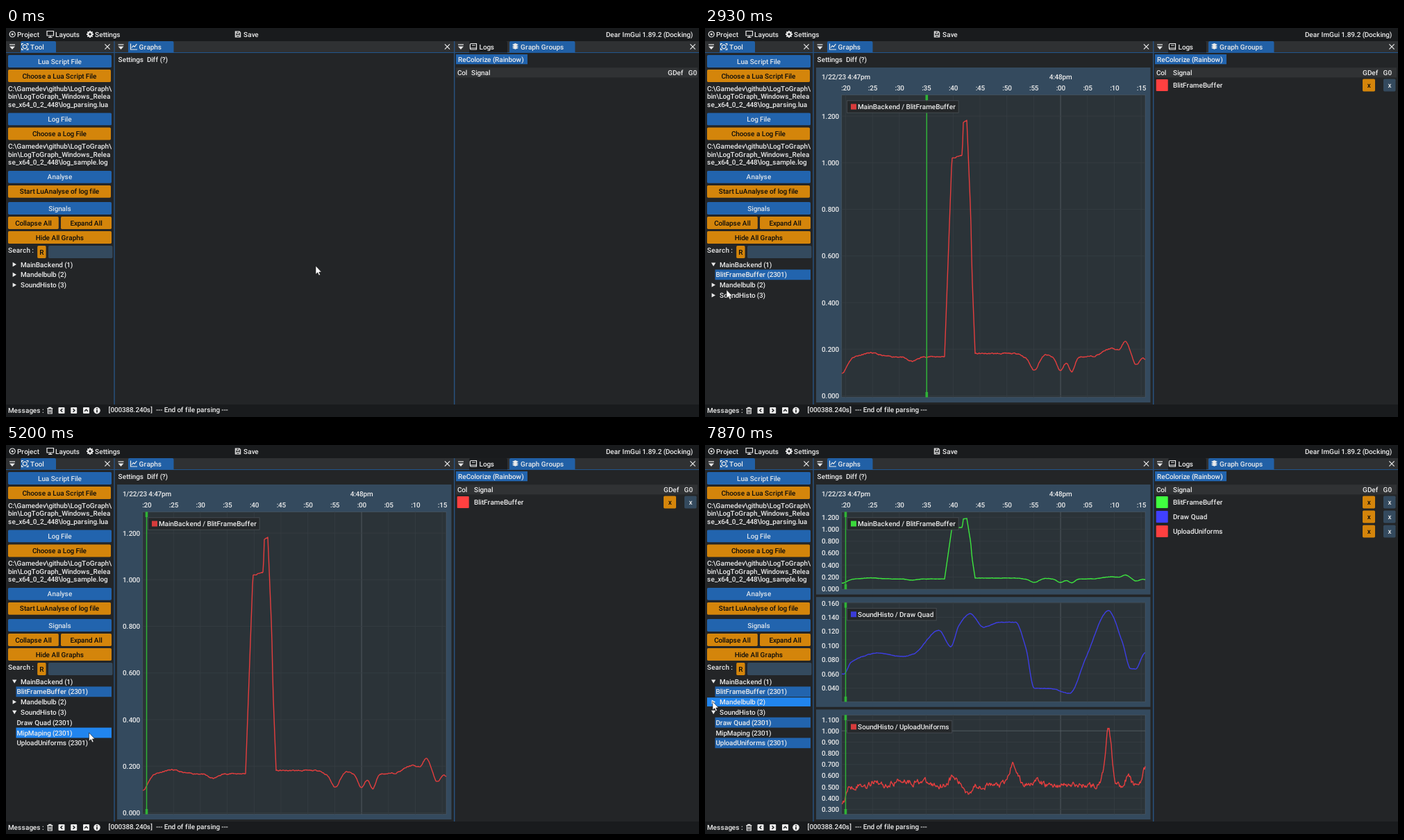
Write an HTML page that moves like this. It is 998 by 561 pixels and loops after 8 s.

```html
<!DOCTYPE html>
<html lang="en">
<head>
<meta charset="utf-8">
<title>Log graphs</title>
<style>
html, body { margin: 0; width: 100%; height: 100%; overflow: hidden; background: #232527; }
svg { display: block; width: 998px; height: 561px; }
text {
  font: 500 9.98px Roboto, "Open Sans", sans-serif;
  font-kerning: none; font-variant-ligatures: none;
  text-rendering: geometricPrecision;
}
.ico { fill: none; stroke: #ebebeb; stroke-width: 1.2; }
.solid { fill: #ebebeb; }
</style>
</head>
<body>
<svg id="stage" viewBox="0 0 998 561" xmlns="http://www.w3.org/2000/svg">
  <g id="chrome"></g>
  <g id="live"></g>
  <path id="cursor" d="M0 0V12.2L2.8 9.7L4.7 13.8L6.6 13L4.8 9H8.4Z" fill="#fff" stroke="#111" stroke-width=".6"/>
</svg>
<script>
const LOOP = 8000, STEP = 0.015, ZOOM = 998 / 1280;
const BLUE = '#2264ae', BRIGHT = '#2185ee', ORANGE = '#d4850b', SLATE = '#344a5e';
const INK = '#ebebeb', DARK = '#191b1d', STRIP = '#2f3133';
const $ = id => document.getElementById(id);

// ---- drawing helpers
// Glyph advances are whole pixels at the unscaled interface size of 12.8 px.
const pen = document.createElement('canvas').getContext('2d');
pen.font = '500 128px Roboto, "Open Sans", sans-serif';
const widths = {};
const advance = c => widths[c] ??= Math.round(pen.measureText(c).width / 10) * ZOOM;
const widthOf = s => [...s].reduce((w, c) => w + advance(c), 0);

function text(x, mid, s, align = 0, fill = INK) {
  x -= widthOf(s) * align;
  const spots = [...s].map(c => { const at = x; x += advance(c); return at.toFixed(2); });
  return `<text x="${spots.join(' ')}" y="${mid + 3.5}" fill="${fill}">${s}</text>`;
}
const rect = (x, y, w, h, fill, r = 0, more = '') =>
  `<rect x="${x}" y="${y}" width="${w}" height="${h}" rx="${r}" fill="${fill}" ${more}/>`;
const line = (x1, y1, x2, y2, color, w = 0.8) =>
  `<path d="M${x1} ${y1}L${x2} ${y2}" stroke="${color}" stroke-width="${w}" fill="none"/>`;
const icon = (d, cls = 'ico') => `<path class="${cls}" d="${d}"/>`;
const button = (x, mid, w, label, fill, ink) =>
  rect(x, mid - 8.9, w, 17.8, fill, 1.6) + text(x + w / 2, mid, label, 0.5, ink);
const bar = (mid, label) => button(3, mid, 149, label, BLUE, '#dce3ea');
const act = (mid, label, x = 3, w = 148) => button(x, mid, w, label, ORANGE, '#0c0c0c');
const menuMark = x => icon(`M${x - 4} 24H${x + 4}`) + icon(`M${x - 4} 26.5H${x + 4}L${x} 31Z`, 'solid');
const cross = x => icon(`M${x - 3.6} 23.4l7.2 7.2m0 -7.2l-7.2 7.2`);
const tab = (x, w, fill = '#2160a6') => `<path d="M${x} 35.5V21q0 -2 2 -2h${w - 4}q2 0 2 2V35.5Z" fill="${fill}"/>`;

function chrome() {
  const file = (y, name) =>
    ['C:\\Gamedev\\github\\LogToGraph\\', 'bin\\LogToGraph_Windows_Relea', 'se_x64_0_2_448\\' + name]
      .map((s, i) => text(3, y + i * 11.7, s)).join('');
  const chevron = (x, turn) => rect(x - 4.5, 547, 9, 9, INK, 1) +
    `<path d="M-1.2 -2.3l2.4 2.3l-2.4 2.3" transform="translate(${x} 551.5) rotate(${turn})" fill="none" stroke="${DARK}" stroke-width="1.4"/>`;
  const gear = [0, 45, 90, 135].map(a =>
    `<path d="M121 4v2.6M121 11.4v2.6" stroke="${INK}" stroke-width="2" transform="rotate(${a} 121 9)"/>`).join('');
  return rect(0, 0, 998, 561, '#232527') + rect(0, 0, 998, 19, DARK) +
    rect(0, 19, 998, 16.5, STRIP) + rect(0, 543, 998, 18, DARK) +
    line(0, 35.5, 998, 35.5, '#2160a6') +
    [156, 645.7].map(x => line(x, 19, x, 543, '#28517d', 1.5)).join('') +
    // menu bar
    '<circle class="ico" cx="9.2" cy="9" r="4"/><circle class="solid" cx="9.2" cy="9" r="1.6"/>' +
    icon('M59 4.5h9.5v6.5h-9.5zM63.7 11v2.5M61 13.3h5.5') +
    gear + '<circle class="ico" cx="121" cy="9" r="2.7" style="stroke-width:2"/>' +
    icon('M330.4 5h5.6l1.6 1.6v6.4h-7.2zM332 5v2.6h3.4V5M332.2 13v-2.6h3.6V13') +
    text(16, 9, 'Project') + text(71, 9, 'Layouts') + text(128, 9, 'Settings') + text(342, 9, 'Save') +
    text(864, 9, 'Dear ImGui 1.89.2 (Docking)') +
    // tabs
    tab(21, 51) + tab(176, 65.5) + tab(667, 55, '#1b1d1f') + tab(725, 94.5) +
    [9, 165.5, 655].map(menuMark).join('') + [146, 635.5, 989].map(cross).join('') +
    icon('M22.6 25v-2.4h2.4M29.4 22.6h2.4V25M31.8 29v2.4h-2.4M25 31.4h-2.4V29M27.2 24l2.8 1.5v3l-2.8 1.5l-2.8 -1.5v-3z') +
    icon('M179.5 22.5v8.5h9.5M181 28.5l2.4 -3l1.8 1.6l3.2 -4') +
    icon('M670 22.5h7.5v8.5h-7.5q-1.6 0 -1.6 -1.6v-5.3q0 -1.6 1.6 -1.6zM669 29h8.5M671 25h4.5') +
    [22, 24.4, 26.8].map(y => icon(`M733.5 ${y}l4.6 2l-4.6 2l-4.6 -2z`, 'solid')).join('') +
    text(35, 27, 'Tool') + text(191.5, 27, 'Graphs') + text(681.5, 27, 'Logs') + text(741, 27, 'Graph Groups') +
    // tool panel
    bar(48, 'Lua Script File') + act(69, 'Choose a Lua Script File') + file(87, 'log_parsing.lua') +
    bar(131.4, 'Log File') + act(152.5, 'Choose a Log File') + file(170.4, 'log_sample.log') +
    bar(214.8, 'Analyse') + act(235.8, 'Start LuAnalyse of log file') +
    bar(260, 'Signals') + act(281, 'Collapse All', 3, 72.8) + act(281, 'Expand All', 79, 73) +
    act(302, 'Hide All Graphs', 3, 149) + text(3, 320, 'Search :') +
    act(323, 'R', 45.2, 12.4) + rect(61, 314.1, 92.5, 17.8, SLATE, 1.6) +
    // graph and group panels
    text(161.5, 45, 'Settings') + text(203, 45, 'Diff (?)') +
    rect(648, 38, 103, 14.2, BLUE) + text(651, 45, 'ReColorize (Rainbow)') +
    rect(648, 57.2, 348, 14.2, '#303234') +
    // message bar
    text(3, 551.8, 'Messages :') +
    icon('M59.3 548.7h8M61.8 548.6v-1.3h3v1.3M60.4 549v7h5.8v-7M62.3 550.5v4M64.3 550.5v4') +
    chevron(80, 180) + chevron(97.7, 0) + chevron(115.5, -90) +
    '<circle class="solid" cx="131" cy="551.6" r="4.8"/>' +
    `<path d="M131 548.3v1.4M131 550.8v3.8" stroke="${DARK}" stroke-width="1.6"/>` +
    text(147.5, 550.8, '[000388.240s]') + text(216, 550.8, '--- End of file parsing ---');
}

// ---- signals as functions of the plot x
const LEFT = 196.7, RIGHT = 634, X0 = 202.5, PER_SEC = 7.74;
const clamp = p => Math.min(1, Math.max(0, p));
const smooth = p => p * p * (3 - 2 * p);

// Gaussian bumps: centre, width, height
const bumps = (base, list) => x =>
  list.reduce((v, [c, w, h]) => v + h * Math.exp(-(((x - c) / w) ** 2)), base);

// Key points joined by straight lines, or by a monotone cubic when `soft`.
function through(keys, soft) {
  const slope = i => keys[i] && keys[i + 1]
    ? (keys[i + 1][1] - keys[i][1]) / (keys[i + 1][0] - keys[i][0]) : 0;
  const tangent = i => {
    const a = slope(i - 1), b = slope(i);
    return a * b > 0 ? 2 * a * b / (a + b) : 0;
  };
  return x => {
    let i = 0;
    while (i < keys.length - 2 && keys[i + 1][0] < x) i++;
    const [xa, va] = keys[i], [xb, vb] = keys[i + 1], w = xb - xa, p = clamp((x - xa) / w);
    if (!soft) return va + (vb - va) * p;
    const q = 1 - p;
    return va + (vb - va) * smooth(p) + w * p * q * (tangent(i) * q - tangent(i + 1) * p);
  };
}

const spike = through([[345, 0], [355.5, 0.85], [370.5, 0.865], [372, 1.005], [377, 1.014],
  [382.7, 0.61], [384.5, 0.355], [389, 0.013396], [451, 0.013396], [460, 0]]);
const ripple = bumps(0.168, [[197, 10, -0.07], [238, 16, 0.016], [298, 10, -0.02], [474, 8, -0.058],
  [491, 6, 0.008], [512, 7, -0.06], [528, 6, -0.065], [585, 16, 0.035], [606, 7, 0.06], [621, 6, -0.035], [640, 8, -0.02]]);
const blit = x => ripple(x) + spike(x);

const quad = through([[200, 0.06], [211, 0.077], [250, 0.0895], [284, 0.0845], [300, 0.088], [337, 0.1215],
  [354, 0.0985], [366, 0.129], [382, 0.145], [401, 0.126], [424, 0.133], [447, 0.133], [462, 0.097], [474, 0.04],
  [500, 0.039], [525, 0.0325], [549, 0.084], [581, 0.149], [601, 0.105], [613, 0.067], [620, 0.067], [634, 0.09]], true);

const load = bumps(0.515, [[195, 9, -0.19], [246, 6, 0.05], [285, 14, 0.05], [312, 10, 0.04], [357, 8, 0.07],
  [379, 7, -0.06], [444, 8, 0.19], [475, 10, 0.04], [581, 6.5, 0.5], [609, 5, 0.08], [636, 8, 0.16]]);

let seed = 11;
const rnd = () => (seed = seed * 16807 % 2147483647) / 2147483647 - 0.5;
function sample(fn, noise) {
  const pts = [];
  for (let x = 197, drift = 0; x <= RIGHT; x++) {
    drift = drift * 0.6 + rnd() * noise;
    pts.push([x, fn(x) + drift]);
  }
  return pts;
}

const SIGNALS = [
  { group: 'MainBackend', name: 'BlitFrameBuffer', pts: sample(blit, 0.004), lo: -0.006, hi: 1.291, step: 0.2 },
  { group: 'SoundHisto', name: 'Draw Quad', pts: sample(quad, 0.0006), lo: 0.0206, hi: 0.1608, step: 0.02 },
  { group: 'SoundHisto', name: 'UploadUniforms', pts: sample(load, 0.045), lo: 0.257, hi: 1.141, step: 0.1 }
];

// Cosine rainbow spread over the visible signals
function color(i, count) {
  const part = c => Math.round(127.5 + 127.5 * Math.cos(2 * Math.PI * ((i + 1) / count - c / 3)));
  return `rgb(${part(0)},${part(1)},${part(2)})`;
}

function plot(i, count, mark) {
  const { group, name, pts, lo, hi, step } = SIGNALS[i];
  const gap = 3.6, h = (483 - gap * (count - 1)) / count, top = 57 + i * (h + gap);
  const y0 = top + (i ? 8 : 39.5), y1 = top + h - 7.5, tint = color(i, count);
  const toY = v => y1 - (v - lo) / (hi - lo) * (y1 - y0);
  let s = rect(160, top, 481.5, h, SLATE) +
    rect(LEFT, y0, RIGHT - LEFT, y1 - y0, '#2b3338', 0, 'stroke="#6e7882" stroke-opacity=".35" stroke-width=".8"');
  for (let k = 0; k < 12; k++) {
    const x = X0 + k * 5 * PER_SEC;
    s += line(x, y0, x, y1, k === 8 ? '#5c646a' : '#363e43');
    if (!i) s += text(x + 0.3, 86.5, ':' + String((20 + k * 5) % 60).padStart(2, '0'), 0.5);
  }
  if (!i) s += text(203, 70.8, '1/22/23 4:47pm', 0.5) + text(512.2, 70.8, '4:48pm', 0.5);
  for (let k = Math.ceil(lo / step); k <= hi / step; k++) {
    const y = toY(k * step);
    s += line(LEFT, y, RIGHT, y, i === 2 && k === 10 ? '#5c646a' : '#363e43') +
      text(193, y, (k * step).toFixed(3), 1);
  }
  const d = pts.map(([x, v]) => x + ' ' + toY(v).toFixed(2)).join('L');
  s += `<path d="M${d}" fill="none" stroke="${tint}" stroke-opacity=".87" stroke-width="1.4" stroke-linejoin="round"/>` +
    line(mark, y0, mark, y1, '#2fb237', 1.5) + line(mark, y0, mark, y0 + 7.5, '#2fb237', 3.6) +
    line(mark, y1 - 7.5, mark, y1, '#2fb237', 3.6);
  const label = `${group} / ${name}`, mid = y0 + 17;
  return s + rect(204.5, mid - 8.7, widthOf(label) + 19.5, 17.4, '#242629', 0, 'fill-opacity=".92" stroke="#4a5056" stroke-width=".8"') +
    rect(210, mid - 4, 8, 8, tint, 0, 'opacity=".82"') + text(220, mid, label);
}

function groups(count) {
  const shift = count ? 6 : 0;
  let s = text(650, 64.3, 'Col') + text(count ? 674 : 670, 64.3, 'Signal') +
    text(953 - shift, 64.3, 'GDef') + text(982.5 - shift, 64.3, 'G0');
  for (let i = 0; i < count; i++) {
    const y = 82.5 + i * 21;
    s += rect(649.7, y - 8.5, 17, 17, color(i, count), 1) + text(674, y, SIGNALS[i].name) +
      act(y, 'x', 947, 18) + button(977, y, 17.5, 'x', SLATE);
  }
  return s;
}

// ---- clicks, in steps: press on a tree row, then its effect
const OPEN_MAIN = 19, PICK_BLIT = 32, OPEN_SOUND = 60, PICK_QUAD = 97, PICK_UPLOAD = 107;
const PICKS = [PICK_BLIT, PICK_QUAD, PICK_UPLOAD];
const held = n => PICKS.includes(n) || n >= OPEN_MAIN && n < OPEN_MAIN + 2 || n >= OPEN_SOUND && n < OPEN_SOUND + 3;

function tree(n, mouse) {
  const rows = [];
  const node = (label, open, kids = []) => {
    rows.push({ label, node: true, open });
    if (open) kids.forEach(([name, pick]) => rows.push({ label: name + ' (2301)', on: n >= pick }));
  };
  node('MainBackend (1)', n >= OPEN_MAIN, [['BlitFrameBuffer', PICK_BLIT]]);
  node('Mandelbulb (2)', false);
  node('SoundHisto (3)', n >= OPEN_SOUND, [['Draw Quad', PICK_QUAD], ['MipMaping', Infinity], ['UploadUniforms', PICK_UPLOAD]]);
  return rows.map((r, i) => {
    const y = 341 + i * 14.8, half = r.node ? 6.4 : 7.4, x = r.node ? 3 : 14.5;
    const over = mouse.x > x && mouse.x < 152 && Math.abs(mouse.y - y) < half;
    const fill = over && !held(n) ? BRIGHT : over || r.on ? BLUE : '';
    const back = fill ? rect(x, y - half, 152 - x, half * 2, fill) : '';
    if (!r.node) return back + text(15.5, y, r.label);
    const arrow = r.open ? `M9 ${y - 2.6}h6.4l-3.2 5.4z` : `M9.6 ${y - 3.2}v6.4l5.4 -3.2z`;
    return back + icon(arrow, 'solid') + text(21, y, r.label);
  }).join('');
}

// ---- readout and tooltip while the pointer is over the single plot
function probe({ x, y }) {
  const sec = Math.round((x - X0) / PER_SEC * 1000) / 1000;
  const near = Math.max(0, sec + 0.90765), px = X0 + near * PER_SEC;
  const value = blit(px), py = 530.5 - value * 336.2, left = x + 19.8;
  const title = `MainBackend / BlitFrameBuffer : ${value.toFixed(6)}`;
  return line(px - 15, py, px + 16, py, '#2fa037', 0.9) +
    `<circle cx="${px}" cy="${py}" r="3.9" fill="none" stroke="#c9b62c" stroke-width="1.3"/>` +
    text(627, 518.5, `:${(20 + sec).toFixed(3)}, ${((530.5 - y) / 336.2).toFixed(3)}`, 1) +
    rect(left, y, widthOf(title) + 6, 42.7, '#25272a', 0, 'fill-opacity=".95" stroke="#50565c" stroke-width=".8"') +
    text(left + 3, y + 8.5, title) +
    text(left + 3, y + 23, `time : ${(1674406040 + near).toFixed(6)}`) +
    text(left + 3, y + 35, `date : 2023/0/22 17:47:${(20 + near).toFixed(6)}`);
}

// ---- pointer moves: first step, last step, x, y reached
const MOVES = [
  [0, 2, 144, 379], [5, 11, 11, 349.6], [14, 17, 11, 342], [23, 29, 34, 357.5],
  [43, 43.7, 31, 377.6], [44, 47, 26, 405], [47, 51, 11, 384], [53, 54, 11, 383],
  [65, 69, 397.837, 371.2], [72, 80, 68, 423], [81, 84, 67, 416], [90, 93, 67, 402],
  [99, 103, 67, 428], [109, 118, 11, 370]
];
function pointer(n) {
  let x = 446, y = 343;
  for (const [from, to, tx, ty] of MOVES) {
    const p = smooth(clamp((n - from) / (to - from)));
    x += (tx - x) * p;
    y += (ty - y) * p;
  }
  return { x, y };
}

function scene(n) {
  const mouse = pointer(n - 0.25);
  const count = PICKS.filter(p => n > p).length;
  const inside = count && mouse.x > LEFT && mouse.x < RIGHT;
  const mark = inside ? mouse.x : n < 70 ? 319.3 : X0;
  let s = tree(n, mouse) + groups(count);
  for (let i = 0; i < count; i++) s += plot(i, count, mark);
  return s + (inside ? probe(mouse) : '');
}

$('chrome').innerHTML = chrome();
const start = performance.now();
let shown = -1;
function tick() {
  const t = (performance.now() - start) % LOOP;
  const n = Math.min(119, Math.floor((t + 8) * STEP));
  if (n !== shown) {
    shown = n;
    const p = pointer(n);
    $('live').innerHTML = scene(n);
    $('cursor').setAttribute('transform', `translate(${p.x} ${p.y})`);
  }
  requestAnimationFrame(tick);
}
tick();
</script>
</body>
</html>
```
